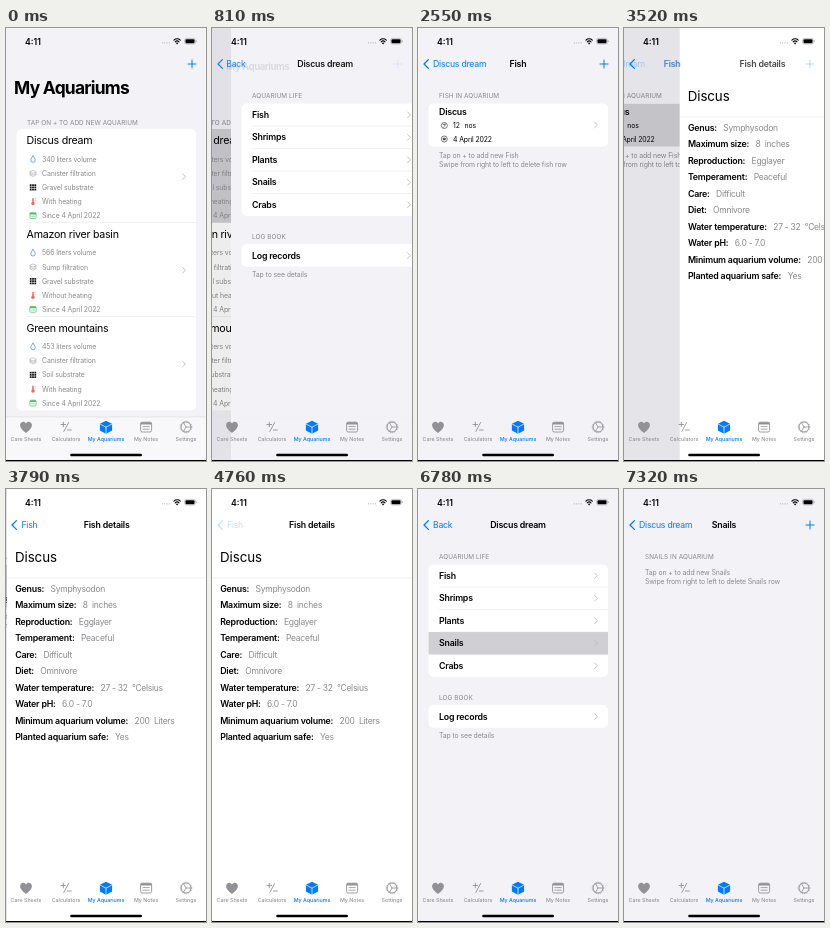
An HTML page that plays this animation: 200 by 433 pixels, repeating every 8 s.

```html
<!DOCTYPE html>
<html lang="en">
<head>
<meta charset="utf-8">
<title>Aquarium app</title>
<style>
  html, body { margin: 0; width: 100%; height: 100%; overflow: hidden; background: #f2f2f7; }
  svg { display: block; width: 100vw; height: 100vh; }
  text { font-family: Inter, Roboto, sans-serif; fill: #000; white-space: pre; }
  .body { font-size: 8.7px; letter-spacing: -.028em; }
  .bold { font-size: 8.8px; font-weight: 600; letter-spacing: -.023em; }
  .value { font-size: 8.5px; font-weight: 400; letter-spacing: -.032em; }
  .clock { font-size: 8.7px; font-weight: 600; text-anchor: middle; }
  .name { font-size: 10.67px; letter-spacing: -.025em; }
  .head { font-size: 13.3px; letter-spacing: -.005em; }
  .large { font-size: 17.4px; font-weight: 700; letter-spacing: -.042em; }
  .small { font-size: 6.9px; letter-spacing: -.016em; }
  .caps { font-size: 6.4px; letter-spacing: .012em; }
  .tab { font-size: 5.3px; font-weight: 500; text-anchor: middle; fill: #929296; }
  .gray { fill: #8a8a8e; }
  .blue { fill: #007aff; }
  .line { fill: none; stroke-linecap: round; stroke-linejoin: round; }
</style>
</head>
<body>
<svg id="stage" viewBox="0 0 200 433" preserveAspectRatio="none"></svg>
<script>
const BLUE = '#007aff', GRAY = '#929296', LOOP = 8000;
const BG = '#f2f2f7';

// Drawing helpers; text is placed by its vertical centre.
const text = (x, cy, cls, str, shift = 2.5) =>
  `<text x="${x}" y="${cy + shift}" class="${cls}">${str}</text>`;
const small = (x, cy, str, cls = 'gray') => text(x, cy, 'small ' + cls, str);
const caps = (cy, str) => text(21, cy, 'caps gray', str, 2.3);
const path = (d, color, w = .7) =>
  `<path class="line" d="${d}" stroke="${color}" stroke-width="${w}"/>`;
const rect = (x, y, w, h, fill, rx = 0, extra = '') =>
  `<rect x="${x}" y="${y}" width="${w}" height="${h}" fill="${fill}" rx="${rx}" ${extra}/>`;
const chevron = y => path(`M176.6 ${y - 2.8}l2.8 2.8l-2.8 2.8`, '#bcbcc0', .9);
const divider = y => rect(21, y - .15, 169.5, .35, '#d5d5d9');

function card(id, y, h, inner) {
  return `<clipPath id="${id}-clip">${rect(10.5, y, 179.5, h, '#fff', 5)}</clipPath>` +
    rect(10.5, y, 179.5, h, '#fff', 5) +
    `<g clip-path="url(#${id}-clip)">` +
    `<rect id="${id}-mark" x="10" width="181" fill="#d0d0d4" opacity="0"/>${inner}</g>`;
}

const icons = {
  drop: y => path(`M27 ${y - 3.4}c1 1.6 2.2 2.8 2.2 4.3a2.2 2.2 0 0 1-4.4 0c0-1.5 1.2-2.7 2.2-4.3z`, '#3d8bf0', .75),
  layers: y => [1.5, 0, -1.5].map(d =>
    `<path d="M23.6 ${y + d}l3.4-1.7l3.4 1.7l-3.4 1.7z" fill="#fff" stroke="#9a9a9e" stroke-width=".5"/>`).join(''),
  grid: y => [0, 1, 2, 3, 4, 5, 6, 7, 8].map(i =>
    rect(23.8 + i % 3 * 2.3, y - 3.2 + Math.floor(i / 3) * 2.3, 1.8, 1.8, '#111', .3)).join(''),
  heat: y => path(`M27 ${y - 2.6}v3.6`, '#f0807c', 1.8) +
    `<circle cx="27" cy="${y + 2}" r="1.7" fill="#ee6a66"/>` + path(`M29 ${y - 2.8}h1M29 ${y - 1}h.8`, '#ee8884', .5),
  date: y => rect(23.9, y - 2.9, 6.2, 5.8, 'none', 1, 'stroke="#45c463" stroke-width=".7"') +
    rect(23.9, y - 2.9, 6.2, 1.8, '#45c463', .6) + path(`M25.5 ${y + .7}h3`, '#45c463', .6)
};

function tankRow(i, name, liters, filter, base, heat) {
  const y = 101 + i * 93.75;
  const facts = [['drop', liters + ' liters volume'], ['layers', filter + ' filtration'],
    ['grid', base + ' substrate'], ['heat', heat + ' heating'], ['date', 'Since 4 April 2022']];
  return text(20.6, y + 11.2, 'name', name, 3.9) + chevron(y + 47.6) + (i ? divider(y) : '') +
    facts.map(([icon, label], k) => {
      const cy = y + 30.2 + k * 14.1;
      return icons[icon](cy) + small(36, cy, label);
    }).join('');
}

const tankList = caps(94.5, 'TAP ON + TO ADD NEW AQUARIUM') + card('tanks', 101, 281.5,
  tankRow(0, 'Discus dream', 340, 'Canister', 'Gravel', 'With') +
  tankRow(1, 'Amazon river basin', 566, 'Sump', 'Gravel', 'Without') +
  tankRow(2, 'Green mountains', 453, 'Canister', 'Soil', 'With'));

const tankMenu = caps(68, 'AQUARIUM LIFE') + card('tank', 75.5, 112.5,
  ['Fish', 'Shrimps', 'Plants', 'Snails', 'Crabs'].map((label, i) => {
    const cy = 86.8 + i * 22.5;
    return text(21, cy, 'bold', label, 3.1) + chevron(cy) + (i ? divider(cy - 11.3) : '');
  }).join('')) +
  caps(209, 'LOG BOOK') + rect(10.5, 216, 179.5, 22.8, '#fff', 5) +
  text(21, 227.6, 'bold', 'Log records', 3.1) + chevron(227.5) + small(21, 246.5, 'Tap to see details');

const badge = (y, inner) => `<circle cx="26.3" cy="${y}" r="3" fill="none" stroke="#222" stroke-width=".6"/>` + inner;
const fishList = caps(68, 'FISH IN AQUARIUM') + card('fish', 75.5, 43.3,
  text(21, 84, 'bold', 'Discus', 3.1) + chevron(97) +
  badge(97.5, path('M25.6 99l1.4-1.4v-1.6M25.2 96.4h1.8', '#222', .6)) +
  small(35, 97.5, '12', '') + small(46.5, 97.5, 'nos', '') +
  badge(111, rect(24.9, 109.8, 2.8, 2.5, '#555', .4)) + small(35, 111, '4 April 2022', '')) +
  small(21, 127.5, 'Tap on + to add new Fish') +
  small(21, 136, 'Swipe from right to left to delete fish row');

const snailList = caps(68, 'SNAILS IN AQUARIUM') + small(21, 83.5, 'Tap on + to add new Snails') +
  small(21, 92.5, 'Swipe from right to left to delete Snails row');

const facts = [['Genus', 'Symphysodon'], ['Maximum size', '8\u00a0 inches'], ['Reproduction', 'Egglayer'],
  ['Temperament', 'Peaceful'], ['Care', 'Difficult'], ['Diet', 'Omnivore'],
  ['Water temperature', '27 - 32\u00a0 °Celsius'], ['Water pH', '6.0 - 7.0'],
  ['Minimum aquarium volume', '200\u00a0 Liters'], ['Planted aquarium safe', 'Yes']];
const fishFacts = text(8, 68.5, 'head', 'Discus', 4.7) + rect(0, 88.8, 200, .35, '#dcdce0') +
  facts.map(([key, value], i) => text(8.2, 99.5 + i * 16.5, 'bold',
    `${key}:<tspan class="value gray" dx="6.4">${value}</tspan>`, 3.1)).join('');

const screens = {
  tanks: { title: '', back: '', plus: true, body: tankList },
  tank: { title: 'Discus dream', back: 'Back', body: tankMenu },
  fish: { title: 'Fish', back: 'Discus dream', plus: true, body: fishList },
  facts: { title: 'Fish details', back: 'Fish', body: fishFacts, bg: '#fff' },
  snails: { title: 'Snails', back: 'Discus dream', plus: true, body: snailList }
};

// mark: top and height of the tapped row on the lower screen
const moves = [
  { at: 500, low: 'tanks', top: 'tank', mark: [101, 93.75], hold: 80 },
  { at: 2010, low: 'tank', top: 'fish', mark: [75.5, 22.5] },
  { at: 3370, low: 'fish', top: 'facts', mark: [75.5, 43.3] },
  { at: 4760, low: 'fish', top: 'facts', mark: [75.5, 43.3], pop: true },
  { at: 5540, low: 'tank', top: 'fish', mark: [75.5, 22.5], pop: true },
  { at: 6780, low: 'tank', top: 'snails', mark: [143, 22.5] }
];

const page = ([id, s]) => `<g id="${id}">${rect(0, 0, 200, 433, s.bg || BG)}${s.body}` +
  `${rect(0, 0, 200, 433, '#000', 0, `id="${id}-dim" opacity="0"`)}</g>`;
const nav = ([id, s]) => `<g id="${id}-nav">` +
  `<text id="${id}-title" y="39.1" class="bold">${s.title}</text>` +
  `<text id="${id}-back" y="39.1" class="body blue">${s.back}</text>` +
  `<g id="${id}-plus">${s.plus ? path('M182 36h8M186 32v8', BLUE, 1) : ''}</g></g>`;

const spokes = [0, 1, 2].map(i => {
  const a = Math.PI * i * 2 / 3;
  return `M180 399L${180 + 4.8 * Math.cos(a)} ${399 + 4.8 * Math.sin(a)}`;
}).join('');
const tabs =
  `<path d="M20 405c-3-2.3-5.9-4.8-5.9-7.9c0-3.7 4.3-4.7 5.9-1.7c1.6-3 5.9-2 5.9 1.7c0 3.1-2.9 5.6-5.9 7.9z" fill="${GRAY}"/>` +
  path('M55 396.5h4.6M57.3 394.2v4.6M57.8 403.5l4.8-9M61.3 402h4', GRAY, .9) +
  `<path d="M100 392.7l6.1 3.1v6.6l-6.1 3.3l-6.1-3.3v-6.6z" fill="${BLUE}"/>` +
  path('M94.2 396.1l5.8 3.1l5.8-3.1M100 399.2v6.3', BG, .8) +
  rect(134.6, 394.2, 11, 9.8, 'none', 1.6, `stroke="${GRAY}" stroke-width=".9"`) +
  rect(134.6, 394.2, 11, 2.2, GRAY, 1) + path('M137 398.6h6.2M137 401.2h6.2', GRAY, .8) +
  `<circle cx="180" cy="399" r="5" fill="none" stroke="${GRAY}" stroke-width="1"/>` +
  `<circle cx="180" cy="399" r="5.8" fill="none" stroke="${GRAY}" stroke-width=".7" stroke-dasharray="1 1.02"/>` +
  path(spokes, GRAY, .8) +
  ['Care Sheets', 'Calculators', 'My Aquariums', 'My Notes', 'Settings'].map((label, i) =>
    text(20 + i * 40, 411, i === 2 ? 'tab blue' : 'tab', label, 2)).join('');

const statusBar = '<text x="27" y="16.5" class="clock">4:11</text>' +
  [0, 1, 2, 3].map(i => `<circle cx="${156.4 + i * 2.3}" cy="14.8" r=".65" fill="#b5b5b9"/>`).join('') +
  path('M167.9 12.1a4.6 4.6 0 0 1 6.4 0M169.2 13.8a2.8 2.8 0 0 1 3.8 0', '#000', 1.1) +
  '<path d="M169.9 15l1.2 1.5l1.2-1.5a1.8 1.8 0 0 0-2.4 0z"/>' +
  rect(178.7, 10.4, 10.6, 5.6, 'none', 1.7, 'stroke="#8e8e92" stroke-width=".5"') +
  rect(179.5, 11.2, 9, 4, '#000', 1) + rect(189.9, 12.3, .7, 1.8, '#8e8e92', .4);

const entries = Object.entries(screens);
document.getElementById('stage').innerHTML =
  `<g id="pages">${entries.map(page).join('')}</g>` +
  `<g id="tabfill">${rect(0, 389, 200, 44, '#f8f8fa')}${rect(0, 388.8, 200, .4, '#c6c6ca')}</g>` + tabs +
  `<g id="chev">${path('M10.4 31.6l-4.4 4.4l4.4 4.4', BLUE, 1.3)}</g>` +
  `<text id="large" class="large">My Aquariums</text>` + entries.map(nav).join('') +
  statusBar + rect(64.2, 425.7, 71.8, 2.6, '#000', 1.3) + rect(0, 432, 200, 1, '#000');

const el = {};
document.querySelectorAll('#stage [id]').forEach(e => el[e.id] = e);
const set = (id, attrs) => { for (const k in attrs) el[id].setAttribute(k, attrs[k]); };
const show = (id, on) => el[id].setAttribute('display', on ? 'inline' : 'none');
const titleX = id => id === 'tanks' ? 8 : 100 - el[id + '-title'].getComputedTextLength() / 2;

const STEPS = 14, SPAN = 540;

function progress(ms) {
  let n = 0;
  while (n < STEPS && Math.round((n + 1) * SPAN / STEPS / 10) * 10 <= ms) n++;
  if (n === STEPS) return 1;
  const w = 18.26 * Math.max(0, n * SPAN / STEPS - 15) / 1000;
  return 1 - (1 + w) * Math.exp(-w);
}

function render(t) {
  const move = moves.filter(m => m.at <= t).pop();
  let low = 'tanks', top = 'tank', cover = 0, press = 1;
  if (move) {
    ({ low, top } = move);
    const p = progress(t - move.at - (move.hold || 0));
    cover = move.pop ? 1 - p : p;
    if (move.pop) press = .25 + .75 * p;
    set(low + '-mark', { y: move.mark[0], height: move.mark[1], opacity: move.pop ? cover : 1 });
  } else {
    set('tanks-mark', { opacity: 0 });
  }
  const rest = 1 - cover;

  for (const id in screens) {
    const used = id === low || id === top;
    show(id, used);
    show(id + '-nav', used);
  }
  el.pages.append(el[top]);
  set(low, { transform: `translate(${-60 * cover} 0)` });
  set(top, { transform: `translate(${200 * rest} 0)` });
  set(low + '-dim', { opacity: .08 * cover });
  set(top + '-dim', { opacity: 0 });
  if (el[top + '-mark']) set(top + '-mark', { opacity: 0 });

  // The lower title turns into the upper back label, a little behind the page.
  const slide = cover ** 1.2;
  const start = titleX(low), x = start + (15 - start) * slide;
  set(low + '-title', { x, opacity: rest });
  set(top + '-back', { x, opacity: cover * press });
  set(low + '-back', { x: 15 - 70 * slide, opacity: rest });
  set(top + '-title', { x: titleX(top) + 138 * rest, opacity: cover });
  set(low + '-plus', { opacity: rest });
  set(top + '-plus', { opacity: cover });

  const root = low === 'tanks';
  set('chev', { opacity: root ? cover : press });
  set('tabfill', { opacity: root ? rest : 0 });
  set('large', {
    opacity: root ? rest : 0,
    transform: `translate(${8 + 7 * cover} ${66 - 27 * cover}) scale(${1 - .5 * cover})`
  });
}

function tick() {
  render(performance.now() % LOOP);
  requestAnimationFrame(tick);
}
tick();
</script>
</body>
</html>
```
